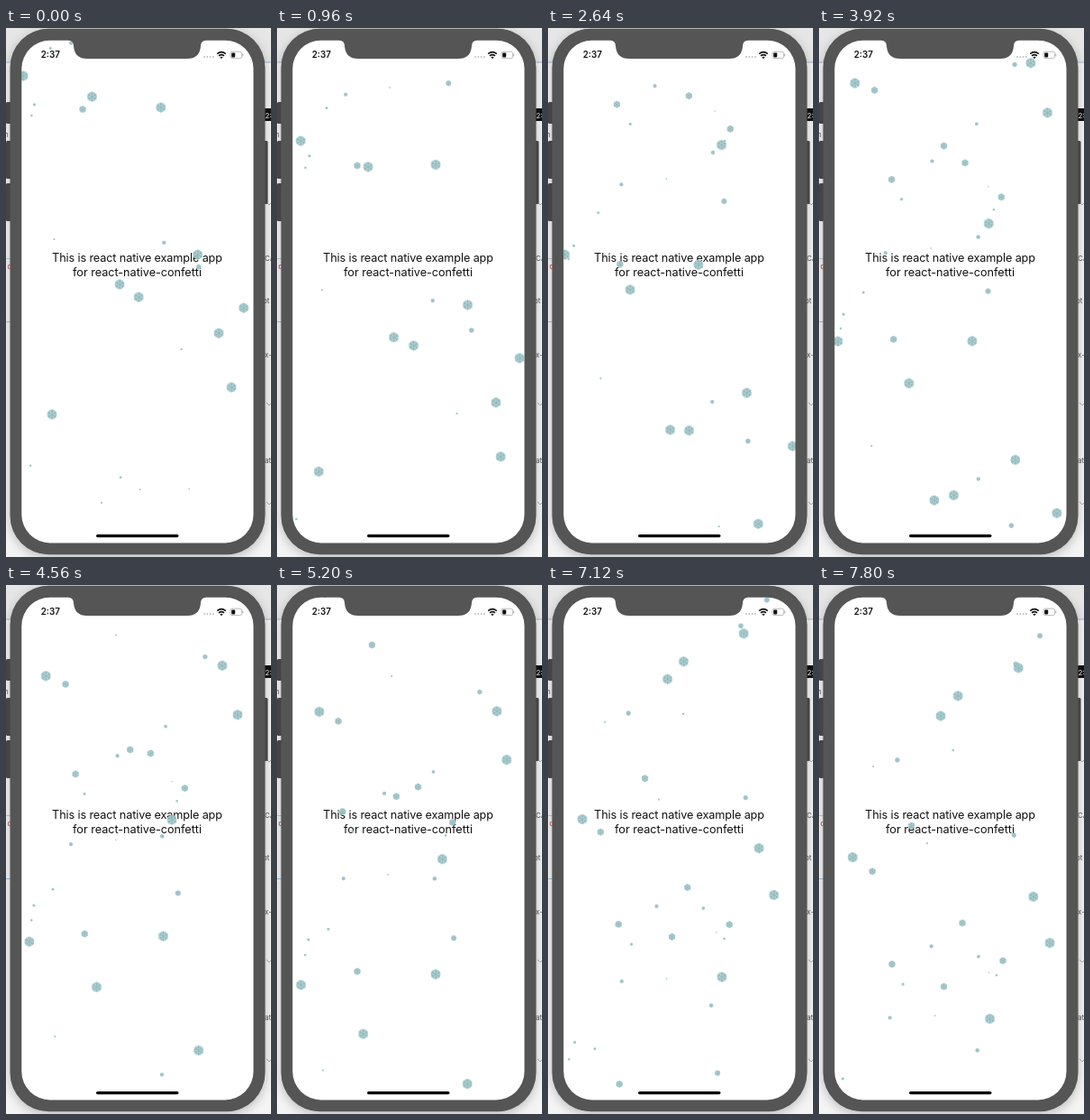
Animation, 294 px wide and 586 px high, one loop 7.84 s. Source, as an HTML page with a canvas:

```html
<!DOCTYPE html>
<html lang="en">
<head>
<meta charset="utf-8">
<title>Confetti demo</title>
<style>
  html, body { margin: 0; width: 100%; height: 100%; overflow: hidden; background: #f4f4f4; }
  svg, canvas { position: absolute; left: 0; top: 0; width: 294px; height: 586px; }
  text { font-family: Inter, "Liberation Sans", sans-serif; }
  .label { font-size: 12.7px; letter-spacing: -.13px; text-anchor: middle; fill: #111; }
  .label + .label { letter-spacing: -.04px; }
  .side { font-size: 8px; fill: #555; }
  .shadow { filter: drop-shadow(0 3px 6px rgba(0, 0, 0, .25)); }
</style>
</head>
<body>
<!-- desktop behind the phone, screen and message -->
<svg viewBox="0 0 294 586">
  <rect width="294" height="586" fill="#f4f4f4"/>
  <rect width="294" height="38" fill="#e6e6e6"/>
  <rect y="37.5" width="294" height="1" fill="#9fb4d0"/>
  <rect y="255" width="8" height="1" fill="#b9c9dc"/>
  <rect y="325" width="8" height="1" fill="#9fc0dc"/>
  <rect x="284" y="89" width="10" height="14" fill="#111"/>
  <text x="287.5" y="100" class="side" style="fill:#fff">2:</text>
  <g class="side">
    <text x="-2" y="121">n</text>
    <text x="-1" y="158">e</text>
    <text x="1.5" y="267" fill="#c33">d</text>
    <text x="287" y="258">CA</text>
    <text x="285" y="305">ot</text>
    <text x="287" y="365">x-</text>
    <text x="287" y="482">at</text>
  </g>
  <path d="M289 193l3 3 2-2M289 415l3 3 2-2M289 525l3 3 2-2" fill="none" stroke="#999" stroke-width=".8"/>
  <rect class="shadow" x="5" y="1" width="282" height="582" rx="43" fill="#555"/>
  <rect x="16" y="12" width="260" height="560" rx="32" fill="#fff"/>
  <text class="label" x="145.5" y="258.7">This is react native example app</text>
  <text class="label" x="145.5" y="274.7">for react-native-confetti</text>
</svg>

<canvas id="snow"></canvas>

<!-- phone body and status bar -->
<svg viewBox="0 0 294 586">
  <g fill="#444">
    <rect x="0" y="82" width="7" height="24" rx="1.5"/>
    <rect x="0" y="125" width="7" height="42" rx="1.5"/>
    <rect x="0" y="172" width="7" height="42" rx="1.5"/>
    <rect x="285" y="125" width="5.5" height="70" rx="1.5"/>
  </g>
  <path fill="#555" fill-rule="evenodd" d="M47.5 .7H244.5A43 43 0 0 1 287.5 43.7V540.3A43 43 0 0 1 244.5 583.3H47.5A43 43 0 0 1 4.5 540.3V43.7A43 43 0 0 1 47.5 .7Z
    M49 13.7A31.5 31.5 0 0 0 17.3 45V539A31.5 31.5 0 0 0 49 570.4H243A31.5 31.5 0 0 0 274.5 539V45A31.5 31.5 0 0 0 243 13.7H222Q216 14 216 20Q215 34 201 34H90Q76 34 75 20Q75 14 69 13.7Z"/>
  <text x="38.7" y="33.3" font-size="9.8" font-weight="600" fill="#111">2:37</text>
  <g fill="#bbb">
    <circle cx="220" cy="32" r=".9"/><circle cx="223.3" cy="32" r=".9"/>
    <circle cx="226.6" cy="32" r=".9"/><circle cx="229.9" cy="32" r=".9"/>
  </g>
  <path d="M234.2 28.6Q239 24.6 243.8 28.6M236 30.9Q239 28.4 242 30.9" fill="none" stroke="#111" stroke-width="1.5"/>
  <path d="M237.3 32.3Q239 31 240.7 32.3L239 34.2Z" fill="#111"/>
  <rect x="249" y="26.2" width="12.6" height="7.4" rx="2" fill="none" stroke="#aaa" stroke-width=".8"/>
  <rect x="250.2" y="27.4" width="4" height="5" rx=".8" fill="#111"/>
  <rect x="262.3" y="28.6" width="1" height="2.6" rx=".5" fill="#aaa"/>
  <rect x="100" y="561" width="91.5" height="3.2" rx="1.6" fill="#000"/>
</svg>

<script>
const LOOP = 7840, STEP = 40, TOP = 8, FLOOR = 553;
const SWAY = 5, PEAK = 150, WAVE = 275;

// Leading flakes: x, y at time 0, speed in px/s
const large = [
  [22, 53, 75], [96, 76, 81], [171, 88, 66], [216, 251, 58],
  [131, 284, 61], [152, 298, 56], [268, 310, 58], [238, 338, 80],
  [246, 398, 80], [46, 428, 66], [188, -50, 68], [42, -182, 62],
  [239, -271, 79], [252, -212, 78], [130, -323, 60], [150, -314, 56],
  [220, -345, 56]
];
const medium = [
  [84, 90, 65], [76, -87, 65], [157, -78, 58], [199, -44, 59],
  [63, -182, 64], [134, -187, 81], [107, -334, 77]
];

function seeded(seed) {
  return (from, to) => {
    seed = seed * 16807 % 2147483647;
    return from + (to - from) * seed / 2147483647;
  };
}

const random = seeded(2037);
const toFlake = size => ([x, start, speed]) => ({ x, start, speed, size });
const specks = Array.from({ length: 28 }, () => ({
  x: random(22, 274),
  start: random(-420, 540),
  speed: random(58, 80),
  size: random(1.3, 6.5)
}));
const flakes = [...specks, ...medium.map(toFlake(8)), ...large.map(toFlake(11.5))];

const canvas = document.getElementById('snow');
const ctx = canvas.getContext('2d');
const ratio = window.devicePixelRatio || 1;
canvas.width = 294 * ratio;
canvas.height = 586 * ratio;

const polar = (r, a) => [r * Math.cos(a), r * Math.sin(a)];

function star(points, outer, inner) {
  const path = new Path2D();
  for (let i = 0; i < points * 2; i++) {
    path.lineTo(...polar(i % 2 ? inner : outer, Math.PI * i / points - Math.PI / 2));
  }
  path.closePath();
  return path;
}

// Six branched arms in a unit circle
function arms() {
  const path = new Path2D();
  for (let i = 0; i < 6; i++) {
    const a = Math.PI * i / 3 - Math.PI / 2;
    path.moveTo(0, 0);
    path.lineTo(...polar(1, a));
    path.moveTo(...polar(.85, a - .35));
    path.lineTo(...polar(.5, a));
    path.lineTo(...polar(.85, a + .35));
  }
  return path;
}

const body = star(18, 1.04, .84);
const veins = arms();

function drawFlake(x, y, size) {
  ctx.save();
  ctx.translate(x, y);
  ctx.scale(size / 2, size / 2);
  ctx.fillStyle = 'rgba(160, 206, 211, .88)';
  ctx.fill(body);
  ctx.lineWidth = .13;
  ctx.strokeStyle = 'rgba(175, 150, 150, .35)';
  ctx.translate(.08, .08);
  ctx.stroke(veins);
  ctx.translate(-.08, -.08);
  ctx.strokeStyle = 'rgba(115, 175, 182, .4)';
  ctx.stroke(veins);
  ctx.restore();
}

function render(t) {
  ctx.setTransform(ratio, 0, 0, ratio, 0, 0);
  ctx.clearRect(0, 0, 294, 586);
  for (const { x, start, speed, size } of flakes) {
    const y = start + speed * t / 1000;
    if (y < TOP || y > FLOOR) continue;
    drawFlake(x + SWAY * Math.cos(2 * Math.PI * (y - PEAK) / WAVE), y, size);
  }
}

function tick() {
  render(Math.floor(performance.now() % LOOP / STEP) * STEP);
  requestAnimationFrame(tick);
}
tick();
</script>
</body>
</html>
```
